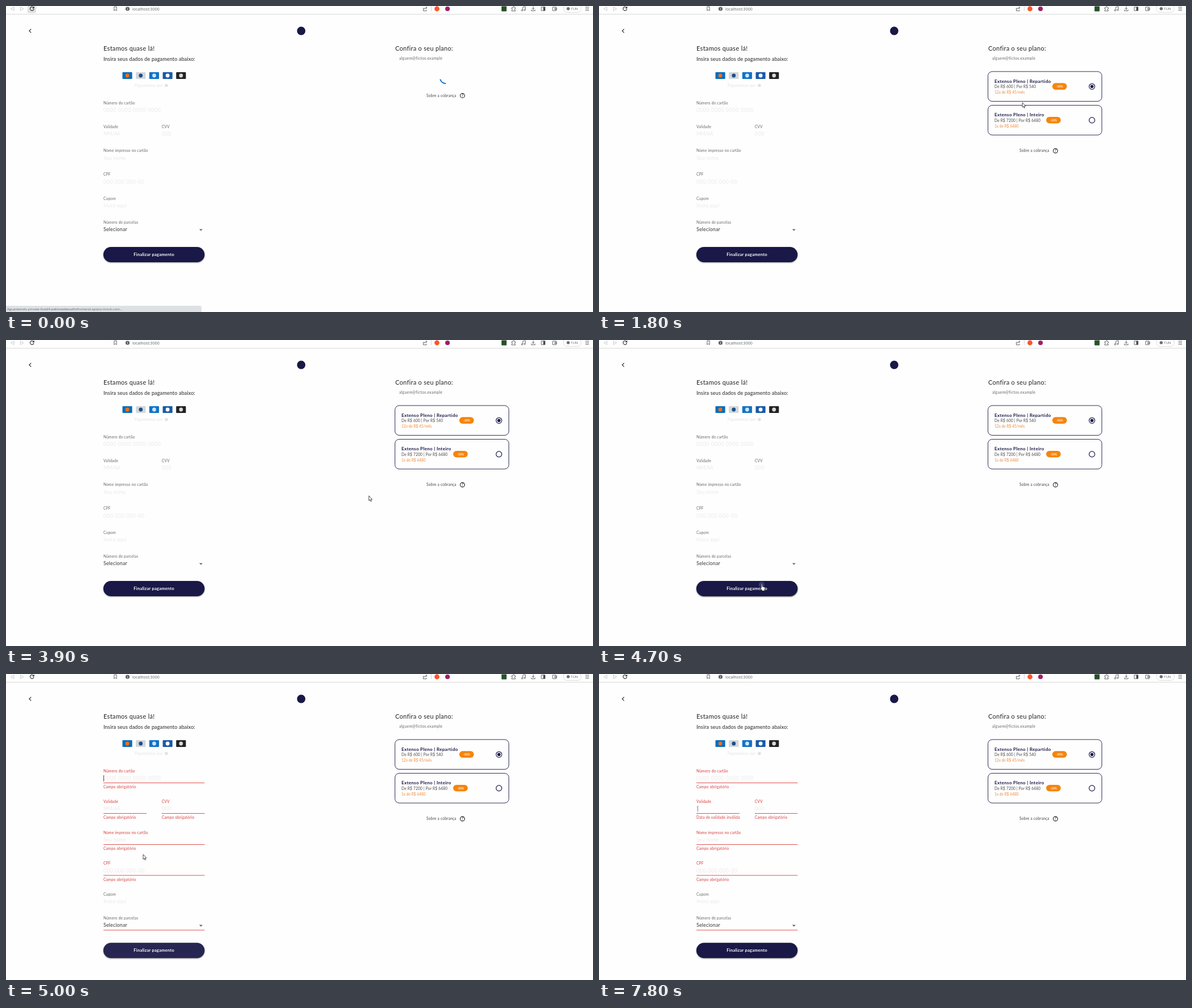
Write an HTML page that moves like this. It is 1036 by 541 pixels and loops after 8000 ms.

```html
<!DOCTYPE html>
<html lang="pt-BR">
<head>
<meta charset="utf-8">
<title>Pagamento</title>
<style>
html, body { margin: 0; width: 100%; height: 100%; overflow: hidden; background: #fefefe; }
svg { display: block; width: 1036px; height: 541px; }
text { font-family: Lato, "Open Sans", sans-serif; fill: #666; font-size: 6.6px; letter-spacing: .2px; white-space: pre; }
.h1 { font-size: 11px; letter-spacing: .3px; fill: #222; }
.h2 { font-size: 9px; letter-spacing: .17px; fill: #222; }
.mail { font-size: 6.8px; letter-spacing: .3px; }
.ph { font-size: 8.8px; font-weight: 300; fill: #d9d9d9; }
.digits { letter-spacing: .65px; }
.mask { letter-spacing: -.3px; }
.value { font-size: 8.8px; fill: #333; }
.typed { font-size: 8.8px; font-weight: 300; fill: #aaa8d0; }
.faint { fill: #e2e2e2; }
.plan { font-size: 8px; font-weight: 700; letter-spacing: .32px; fill: #191847; }
.price { fill: #444; }
.part { fill: #f5893b; letter-spacing: 0; }
.tag { font-size: 5.2px; font-weight: 700; letter-spacing: 0; fill: #fff; text-anchor: middle; }
.go { font-size: 7.5px; font-weight: 700; letter-spacing: .25px; fill: #fff; text-anchor: middle; }
.ui { font-family: "Open Sans", "Noto Sans", sans-serif; font-size: 7.1px; letter-spacing: 0; fill: #5f6368; }
.small { font-size: 6.15px; }
.line { fill: none; stroke: #555a60; stroke-width: .9; }
.dim { stroke: #c4c6c9; }
.dark { stroke: #222; stroke-width: 1.1; }
.err { stroke: #e25250; stroke-width: 1; }
.bad .label, .help { fill: #d8393b; }
#shadow { filter: blur(.8px); }
</style>
</head>
<body>
<svg id="stage" viewBox="0 0 1036 541"></svg>
<script>
const text = (x, y, s, cls = '', id = '') => `<text id="${id}" x="${x}" y="${y}" class="${cls}">${s}</text>`;
const rect = (x, y, w, h, fill, r = 0, id = '') =>
  `<rect id="${id}" x="${x}" y="${y}" width="${w}" height="${h}" rx="${r}" fill="${fill}"/>`;
const dot = (x, y, r, fill, id = '') => `<circle id="${id}" cx="${x}" cy="${y}" r="${r}" fill="${fill}"/>`;
const line = (d, cls = '') => `<path d="${d}" class="line ${cls}"/>`;

const toolbar = () =>
  rect(0, 14, 1036, 1, '#d8d9db') + rect(38, 0, 15, 12.5, '#dfe0e2', 2, 'hover') +
  line('M14 2L8.5 5L14 8.2Z', 'dim') + line('M25.5 2L31 5L25.5 8.2Z', 'dim') +
  line('M48.6 3A3.3 3.3 0 1 0 49.1 5.4M49.3 1.2V3.8H46.6', 'dark') +
  line('M190.8 1.5H195.2V8.3L193 6.5L190.8 8.3Z') +
  dot(214.5, 5, 3.6, '#5f6368') + rect(214.1, 4.5, .8, 2.4, '#fff') + rect(214.1, 3, .8, .8, '#fff') +
  text(223, 7.6, 'localhost:3000', 'ui') +
  line('M738.6 4H736.5V8.6H742V6.5M738.6 6Q739 3 742.6 3M741 1.2L743 3L741 4.8') +
  rect(750, 0, .8, 9, '#ccc') + dot(760.6, 5, 4.4, '#fb542b') + dot(779.2, 5, 4.1, '#9e1f63') +
  rect(874.5, .5, 9, 9, '#28502a', 1) +
  line('M892.5 3H894.5Q894.5 1 896 1T897.5 3H899V5Q897.4 5 897.4 6.2T899 7.5V8.8H892.5V7.2Q894 7 894 6T892.5 4.9Z') +
  line('M912 7.5V2.2L916.6 1.2V6.7M912 7.5A1.2 1.2 0 1 1 911.8 7M916.6 6.7A1.2 1.2 0 1 1 916.4 6.2') +
  line('M930.5 1V6M928.2 4L930.5 6.2L932.8 4M927.2 6.5V8.5H933.8V6.5') +
  line('M944.7 1.8H951.3V8.2H944.7Z') + rect(948.3, 1.8, 3, 6.4, '#444') +
  line('M964.8 2H971V8.2H964.8ZM968.5 4H972V6.4H968.5Z') +
  `<rect x="984" y="-3" width="31" height="14.4" rx="6" class="line dim" style="stroke-width:.6"/>` +
  dot(992.2, 4.8, 2.7, '#6b6f75') + text(997, 7, 'TUN', 'ui small') +
  line('M1022.5 2.2H1029M1022.5 5H1029M1022.5 7.8H1029');

const brands = [['#0a6ebd', '#f0701b'], ['#d3d7db', '#1f4f86'], ['#1273c6', '#cfe4f5'],
  ['#1a5ba8', '#ffffff'], ['#222222', '#d8d8d8']];

const header = () =>
  line('M44.3 40.7L41 44L44.3 47.3', 'dark') + dot(521, 44, 7.4, '#191847') +
  text(172, 78.6, 'Estamos quase lá!', 'h1') +
  text(172, 97, 'Insira seus dados de pagamento abaixo:', 'h2') +
  brands.map(([card, mark], i) =>
    rect(205.5 + i * 23.7, 117, 17.2, 12, card, 1) + dot(214.1 + i * 23.7, 123, 3.4, mark)).join('') +
  text(227, 143, 'Pagamentos por', 'faint') + dot(283, 140.5, 2.8, '#e2e2e2') +
  text(687, 78.6, 'Confira o seu plano:', 'h1') + text(694, 94.8, 'alguem@fictos.example', 'mail');

// x, width, y before and after validation, label, placeholder, class, validated
const fields = [
  [172, 178.5, 171.5, 171.5, 'Número do cartão', '0000 0000 0000 0000', 'ph digits', 1],
  [172, 76, 213.7, 225.5, 'Validade', 'MM/AA', 'ph mask', 1],
  [275, 75.5, 213.7, 225.5, 'CVV', '000', 'ph digits', 1],
  [172, 178.5, 255.9, 280.5, 'Nome impresso no cartão', 'Seu nome', 'ph', 1],
  [172, 178.5, 298.1, 335, 'CPF', '000.000.000-00', 'ph digits', 1],
  [172, 178.5, 340.4, 389.5, 'Cupom', 'Insira aqui', 'ph', 0],
  [172, 178.5, 382.6, 431.8, 'Número de parcelas', 'Selecionar', 'value', 0],
];

const field = ([x, w, , , label, hint, cls, checked], i) => `<g id="field${i}">` +
  text(0, 2.3, label, 'label') + text(0, 15.7, hint, cls, 'hint' + i) +
  (i == 6 ? '<path d="M169 11.8H175L172 14.9Z" fill="#666"/>' : '') +
  `<g class="after">` + (i == 5 ? '' : line(`M0 21H${w}`, 'err')) +
  (checked ? text(0, 30.6, 'Campo obrigatório', 'help', 'help' + i) : '') + '</g></g>';

const button = () => `<g id="button">` +
  rect(172, 427, 178.5, 27, '#000', 13.5, 'shadow') + rect(171.8, 426, 178.7, 27, '#191847', 13.5) +
  rect(171.8, 426, 178.7, 27, '#fff', 13.5, 'glow') + dot(287, 432.5, 5, '#3d3a72', 'ripple') +
  text(261.2, 441.7, 'Finalizar pagamento', 'go') + '</g>';

const plan = (i, name, price, part, tagX) => `<g transform="translate(0 ${i * 59.6})">
  <rect x="686.5" y="115.9" width="201" height="52.6" rx="7.5" fill="none" stroke="#191847" stroke-width=".9"/>` +
  text(698, 135.6, name, 'plan') + text(698, 145.2, price, 'price') + text(698, 155, part, 'part') +
  rect(tagX, 136.3, 25.8, 11.6, '#f5850b', 5.8) + text(tagX + 12.9, 144, '-10%', 'tag') +
  `<circle cx="870" cy="142.3" r="5" fill="none" stroke="#191847" stroke-width="1.2"/>` +
  dot(870, 142.3, 2.8, '#191847', 'radio' + i) + '</g>';

const $ = id => document.getElementById(id);
$('stage').innerHTML = toolbar() + header() + fields.map(field).join('') + button() +
  '<g id="plans">' +
  plan(0, 'Extenso Pleno | Repartido', 'De R$ 600 | Por R$ 540', '12x de R$ 45/mês', 800) +
  plan(1, 'Extenso Pleno | Inteiro', 'De R$ 7200 | Por R$ 6480', '1x de R$ 6480', 789.2) + '</g>' +
  '<path id="spinner" fill="none" stroke="#1976d2" stroke-width="2"/>' +
  '<g id="about">' + text(742, 258.3, 'Sobre a cobrança', 'price') +
  '<circle cx="805.6" cy="256" r="3.9" class="line dark"/>' +
  '<text x="805.7" y="258.3" style="font-weight:700;text-anchor:middle;letter-spacing:0;fill:#222">?</text></g>' +
  '<g id="status">' + rect(-2, 530, 347, 13, '#dee1e4', 2) +
  text(2, 538.2, 'Aguardando private-0ced4-pebmeddesafiofrontend.apiary-mock.com...', 'ui small') + '</g>' +
  text(170.8, 241.3, '1', 'typed', 'typed') + rect(172, 179, .9, 11, '#333', 0, 'caret') +
  `<g id="cursor" stroke="#222" stroke-width=".8" stroke-linejoin="round" fill="#fff">
    <path id="arrow" d="M.5 .5V9L2.4 7.3L3.7 10.4L5 9.8L3.7 6.9H6.4Z"/>
    <path id="hand" d="M2.4 6.6V1.4A.9.9 0 0 1 4.2 1.4V4.8L8 5.7Q9 6 8.9 7.2L8.3 10.4V12.5H3.6V11L.5 7.6Q.8 6 2.4 7.6Z"/>
  </g>`;

const NONE = 0, ARROW = 1, HAND = 2;
const path = [
  [0, 43, 5, NONE], [500, 43, 8, ARROW], [700, 40.5, 14.5, ARROW], [800, 95, 34, ARROW], [900, 190, 68, ARROW],
  [1000, 251, 82, ARROW], [1100, 251, 82, ARROW], [1200, 263, 84, ARROW], [1300, 263, 84, ARROW],
  [1400, 320, 88, ARROW], [1600, 560, 120, ARROW], [1900, 840, 195, ARROW], [2000, 866, 205, HAND],
  [2100, 870, 207, HAND], [2200, 870, 207, HAND], [2300, 865, 203, HAND], [2500, 865, 203, HAND],
  [2800, 866, 150, HAND], [2900, 866, 146.5, HAND], [3500, 866, 146.5, ARROW], [3800, 760, 220, ARROW],
  [4000, 520, 330, ARROW], [4200, 330, 390, ARROW], [4300, 300, 404, ARROW], [4400, 288, 426, HAND],
  [4500, 284, 431, HAND], [4800, 284, 431, ARROW], [4900, 268, 385, ARROW], [5000, 241.5, 318.5, ARROW],
  [5200, 230, 225, ARROW], [5300, 228, 200, ARROW], [5400, 227, 196, ARROW], [5500, 227, 196, ARROW],
  [5600, 227, 196, NONE], [5900, 250, 205, ARROW], [6000, 259, 217, ARROW], [6100, 266, 228, NONE],
  [8000, 266, 228, NONE],
];

const show = (id, on) => $(id).style.display = on ? '' : 'none';
const shift = (id, x, y) => $(id).setAttribute('transform', `translate(${x} ${y})`);
const within = (t, a, b) => t >= a && t < b;

function moveCursor(t) {
  const i = path.findLastIndex(k => k[0] <= t);
  const [t0, x0, y0, kind] = path[i], [t1, x1, y1] = path[i + 1];
  const p = (t - t0) / (t1 - t0);
  shift('cursor', x0 + (x1 - x0) * p, y0 + (y1 - y0) * p);
  show('arrow', kind == ARROW);
  show('hand', kind == HAND);
}

function spin(t) {
  const point = deg => {
    const a = deg * Math.PI / 180;
    return `${776 + 10 * Math.cos(a)} ${127 + 10 * Math.sin(a)}`;
  };
  const tail = 88 + t * .26, length = 78 + t * .25;
  $('spinner').setAttribute('d', `M${point(tail)}A10 10 0 ${+(length > 180)} 1 ${point(tail + length)}`);
}

function draw(t) {
  const loaded = t >= 400, failed = t >= 4800, typed = t >= 7700;
  show('hover', t < 600);
  show('status', !loaded);
  show('spinner', !loaded);
  show('plans', loaded);
  shift('about', 0, loaded ? 0 : -97.6);
  spin(t);

  const second = within(t, 2100, 3100);
  show('radio0', !second);
  show('radio1', second);

  fields.forEach((f, i) => {
    const g = $('field' + i);
    shift('field' + i, f[0], f[failed ? 3 : 2]);
    g.setAttribute('class', failed && f[7] ? 'bad' : '');
    g.querySelector('.after').style.display = failed ? '' : 'none';
  });
  shift('button', 0, failed ? 49.3 : 0);
  $('shadow').setAttribute('opacity', within(t, 4400, 4800) ? .6 : .4);
  $('glow').setAttribute('opacity', failed ? Math.max(0, Math.min(.06, (5400 - t) / 6000)) : 0);
  show('ripple', within(t, 4700, 4800));

  show('hint1', !typed);
  show('typed', typed);
  $('help1').textContent = typed ? 'Data de validade inválida' : 'Campo obrigatório';
  show('caret', within(t, 4800, 5300) || within(t, 5800, 6300) || within(t, 6700, 7200) || typed);
  shift('caret', typed ? 2 : 0, t >= 6700 ? 54 : 0);
  $('caret').setAttribute('fill', typed ? '#8a86c8' : '#333');
  moveCursor(t);
}

const start = performance.now();
function tick() {
  draw(Math.floor((performance.now() - start) % 8000 / 100) * 100);
  requestAnimationFrame(tick);
}
tick();
</script>
</body>
</html>
```
